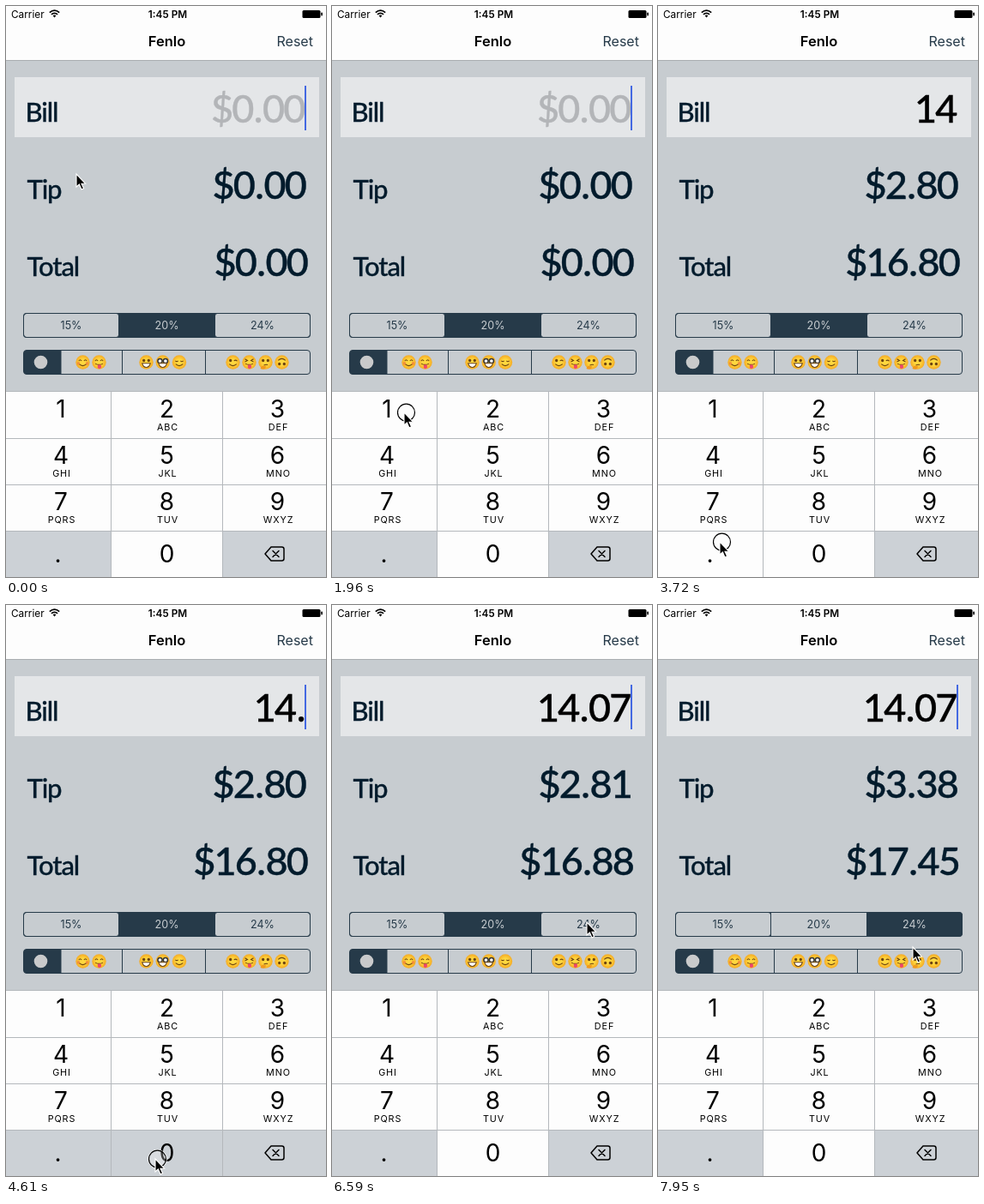
Write an HTML page that moves like this. It is 373 px wide and 666 px high and loops after 8 s.

```html
<!DOCTYPE html>
<html lang="en">
<head>
<meta charset="utf-8">
<title>Tip calculator</title>
<style>
  html, body { margin: 0; width: 100%; height: 100%; overflow: hidden; background: #c7ccd0; }
  svg { display: block; width: 373px; height: 666px; }
  text { font-family: Inter, Roboto, sans-serif; }
  .mid { text-anchor: middle; }
  .label, .sum { font-family: Lato, sans-serif; font-weight: 500; fill: #021b2c; stroke: #021b2c; }
  .label { font-size: 31px; letter-spacing: -1.1px; stroke-width: .3px; }
  .sum { font-size: 45px; letter-spacing: -1.9px; text-anchor: end; stroke-width: .4px; }
  #bill { fill: #000; stroke: #000; }
  #bill.empty { fill: #b3b5b8; stroke: #b3b5b8; }
  .pct { font-size: 12.6px; }
  .digit { font-size: 28px; }
  .abc { font-size: 10.8px; letter-spacing: .9px; }
  .line { fill: none; stroke: #263a49; }
</style>
</head>
<body>
<svg id="stage" viewBox="0 0 373 666">
  <rect width="373" height="666" fill="#c7ccd0"/>
  <rect width="373" height="63" fill="#fdfdfd"/>
  <rect y="63" width="373" height="1" fill="#a9adb0"/>

  <text x="6" y="13.5" font-size="11.8">Carrier</text>
  <g fill="none" stroke="#000" stroke-width="1.7">
    <path d="M50.8 7.6Q56.5 2.6 62.2 7.6M52.9 9.9Q56.5 6.7 60.1 9.9"/>
    <path d="M54.6 11.3Q56.5 9.8 58.4 11.3L56.5 13.4Z" fill="#000" stroke="none"/>
  </g>
  <text x="188.5" y="13.5" class="mid" font-size="11.8" font-weight="600">1:45 PM</text>
  <rect x="345.5" y="5" width="21" height="9" rx="1.5"/>
  <rect x="367.3" y="7.5" width="1.6" height="4" rx=".8"/>
  <text x="187.5" y="47" class="mid" font-size="16.5" font-weight="600">Fenlo</text>
  <text x="315.5" y="47" font-size="16" fill="#263a49">Reset</text>

  <rect x="10" y="83" width="355" height="70" fill="#e4e6e8"/>
  <text x="22.5" y="135" class="label">Bill</text>
  <text x="24.5" y="225" class="label">Tip</text>
  <text x="24.5" y="315" class="label">Total</text>
  <text x="347.5" y="136" class="sum" id="bill"></text>
  <text x="349" y="225" class="sum" id="tip"></text>
  <text x="351" y="315" class="sum" id="total"></text>
  <rect id="caret" x="348" y="93" width="2" height="52" fill="#4469e2"/>

  <g id="rates"></g>
  <rect class="line" x="20.5" y="358.5" width="334" height="28" rx="3.5"/>
  <path d="M24 401.5H64.5V429.5H24Q20.5 429.5 20.5 426V405Q20.5 401.5 24 401.5Z" fill="#263a49"/>
  <rect class="line" x="20.5" y="401.5" width="334" height="28" rx="3.5"/>
  <path class="line" d="M135.5 402V429M232.5 402V429"/>
  <circle cx="40.5" cy="415.5" r="7.8" fill="#c9cacb"/>
  <g id="faces"></g>

  <rect y="449" width="373" height="217" fill="#b4b8bc"/>
  <g id="keys"></g>
  <g fill="none" stroke="#000" stroke-width="1.5" stroke-linejoin="round" stroke-linecap="round">
    <path d="M309 631H321.5Q324 631 324 633.5V644.5Q324 647 321.5 647H309L302 639Z"/>
    <path d="M311 635.5L318 642.5M318 635.5L311 642.5"/>
  </g>

  <g id="pointer">
    <g id="ring" fill="none">
      <circle cx="2.5" cy="-.8" r="11" stroke="#fff" stroke-opacity=".8"/>
      <circle cx="2.5" cy="-.8" r="10" stroke="#000" stroke-width="1.2" fill="#fff" fill-opacity=".25"/>
    </g>
    <path d="M0 -1V14L3.4 11L6 17L8.6 15.8L6 10.2H10.6Z" stroke="#fff" stroke-width="1.1"/>
  </g>
</svg>

<script>
const LOOP = 8000;
const $ = id => document.getElementById(id);
const within = (t, spans) => spans.some(([a, b]) => t >= a && t < b);

// Rate buttons
const rates = [[15, 20.5, 131.5], [20, 131.5, 243.5], [24, 243.5, 354.5]];
$('rates').innerHTML = rates.map(([pct, a, b]) => `
  <rect x="${a}" y="358.5" width="${b - a}" height="28" rx="${pct === 20 ? 0 : 3}" stroke="#263a49"/>
  <text class="pct mid" x="${(a + b) / 2}" y="377">${pct}%</text>`).join('');
const rateEls = rates.map(([pct], i) => ({
  pct, box: $('rates').children[2 * i], label: $('rates').children[2 * i + 1]
}));

// Small faces: shared parts combined per expression
const part = {
  dots: '<circle cx="-2.8" cy="-2" r="1.1" fill="#6b4312"/><circle cx="2.8" cy="-2" r="1.1" fill="#6b4312"/>',
  arcs: '<path d="M-4.6 -1.5Q-3 -4 -1.4 -1.5M1.4 -1.5Q3 -4 4.6 -1.5"/>',
  lids: '<path d="M-4.6 -1.6Q-3 0 -1.4 -1.6M1.4 -1.6Q3 0 4.6 -1.6"/>',
  wink: '<circle cx="-2.8" cy="-2" r="1.1" fill="#6b4312"/><path d="M1.2 -1.6Q3 -3.4 5 -1.4"/>',
  squint: '<path d="M-5 -3.8L-2 -2L-5 -.6M5 -3.8L2 -2L5 -.6"/>',
  specs: '<g stroke="#333" stroke-width="1.5" fill="#fff"><circle cx="-3.2" cy="-1.5" r="2.6"/><circle cx="3.2" cy="-1.5" r="2.6"/></g>',
  smile: '<path d="M-4.2 2.2Q0 6 4.2 2.2"/>',
  grin: '<path d="M-4.8 1.2H4.8Q3.6 6 0 6T-4.8 1.2Z" fill="#fff"/>',
  flat: '<path d="M-2 3.4Q.5 2.4 2.6 3"/>',
  tongue: '<path d="M-4.4 1.6Q0 4.2 4.4 1.6"/><rect x="-1.7" y="2.8" width="4.2" height="4.6" rx="2" fill="#ee476b" stroke="none"/>',
  blush: '<g fill="#f0703c" fill-opacity=".6" stroke="none"><circle cx="-5" cy="1.4" r="1.8"/><circle cx="5" cy="1.4" r="1.8"/></g>',
  hand: '<path d="M-6 7.6L-4.6 4.6L1 4.2L-.8 7.8Q-3.5 9 -6 7.6Z" fill="#f09a1c" stroke="none"/>'
};
const faces = [
  [89.5, 'arcs smile blush'], [108.5, 'arcs tongue'],
  [163.5, 'dots grin'], [182.7, 'specs grin'], [202, 'lids smile'],
  [264.5, 'wink smile'], [283.5, 'squint tongue'], [302.5, 'dots flat hand'], [321.5, 'dots smile', 180]
];
$('faces').innerHTML = `
  <radialGradient id="skin"><stop offset=".4" stop-color="#ffd83f"/><stop offset="1" stop-color="#f4ab25"/></radialGradient>` +
  faces.map(([x, parts, turn = 0]) => `
  <g transform="translate(${x} 415.5) rotate(${turn})" fill="none" stroke="#6b4312" stroke-width="1.1">
    <circle r="8.2" fill="url(#skin)" stroke="none"/>${parts.split(' ').map(p => part[p]).join('')}
  </g>`).join('');

// Keypad
const cols = [[0, 122, 64], [123, 129, 187.5], [253, 120, 316.5]];
const rows = [[450, 54], [505, 53], [559, 53], [613, 53]];
const caps = ['', 'ABC', 'DEF', 'GHI', 'JKL', 'MNO', 'PQRS', 'TUV', 'WXYZ'];
const WHITE = '#fdfdfd', GREY = '#ccd1d6';
const keyEls = {};
[...'123456789.0<'].forEach((name, i) => {
  const [x, w, cx] = cols[i % 3], [y, h] = rows[i / 3 | 0];
  const g = document.createElementNS('http://www.w3.org/2000/svg', 'g');
  const lift = i < 9 ? 480 + 54 * (i / 3 | 0) : 649;
  g.innerHTML = `<rect x="${x}" y="${y}" width="${w}" height="${h}"/>` +
    (name === '<' ? '' : `<text class="digit mid" x="${name === '.' ? 60.5 : cx}" y="${lift}">${name}</text>`) +
    (caps[i] ? `<text class="abc mid" x="${cx + 1}" y="${lift + 15}">${caps[i]}</text>` : '');
  $('keys').append(g);
  keyEls[name] = { box: g.firstChild, grey: '.<'.includes(name) };
});

// Timeline, in ms
const presses = { 1: [2015, 2130], 4: [2890, 3010], '.': [3720, 3890], 0: [4600, 4715], 7: [5370, 5520] };
const touches = [[1950, 2130], [2890, 3010], [3720, 3890], [4600, 4715], [5350, 5500], [7005, 7200]];
const typed = [[0, ''], [2130, '1'], [3010, '14'], [3890, '14.'], [4715, '14.0'], [5500, '14.07']];
const rateAt = 7120;
const path = [
  [120, 82, 197], [740, 84, 263], [970, 84, 263], [1730, 84, 473], [1790, 84, 475], [2150, 84, 475],
  [2720, 81, 528], [3030, 81, 528], [3610, 72, 626], [4060, 72, 626], [4570, 174, 647], [4890, 174, 647],
  [5340, 92, 596], [5880, 92, 596], [6570, 297, 371], [7800, 297, 371], [7950, 297, 400]
];
const blinks = [[130, 580], [1000, 1480], [2180, 2580], [3490, 3890], [5950, 6420], [7010, 7470]];

function position(t) {
  const i = path.findIndex(p => p[0] > t);
  if (i < 1) return path[i ? path.length - 1 : 0].slice(1);
  const [a, x0, y0] = path[i - 1], [b, x1, y1] = path[i];
  const u = (t - a) / (b - a), k = u * u * (3 - 2 * u);
  return [x0 + (x1 - x0) * k, y0 + (y1 - y0) * k];
}

function caretAlpha(t) {
  const gone = blinks.map(([out, back]) => Math.min((t - out) / 160, (back + 130 - t) / 130, 1));
  return 1 - Math.max(0, ...gone);
}

// Dots get a little air on both sides
function setSum(el, s) {
  if (el.textContent === s) return;
  el.textContent = s;
  el.setAttribute('dx', [...s].map((c, i) => c === '.' || s[i - 1] === '.' ? 1.5 : 0).join(' '));
}

function render(t) {
  const bill = typed.filter(e => e[0] <= t).pop()[1];
  const pct = t < rateAt ? 20 : 24;
  const tip = Math.round(bill * pct) / 100;
  setSum($('bill'), bill || '$0.00');
  $('bill').setAttribute('class', bill ? 'sum' : 'sum empty');
  setSum($('tip'), '$' + tip.toFixed(2));
  setSum($('total'), '$' + (+bill + tip).toFixed(2));
  $('caret').setAttribute('opacity', caretAlpha(t));

  for (const r of rateEls) {
    const on = r.pct === pct;
    r.box.setAttribute('fill', on ? '#263a49' : 'none');
    r.label.setAttribute('fill', on ? '#c7ccd0' : '#263a49');
  }
  for (const name in keyEls) {
    const { box, grey } = keyEls[name];
    const down = presses[name] && within(t, [presses[name]]);
    box.setAttribute('fill', grey !== !!down ? GREY : WHITE);
  }
  $('ring').setAttribute('visibility', within(t, touches) ? 'visible' : 'hidden');
  $('pointer').setAttribute('transform', `translate(${position(t)})`);
}

const start = performance.now();
function tick() {
  render((performance.now() - start) % LOOP);
  requestAnimationFrame(tick);
}
tick();
</script>
</body>
</html>
```
